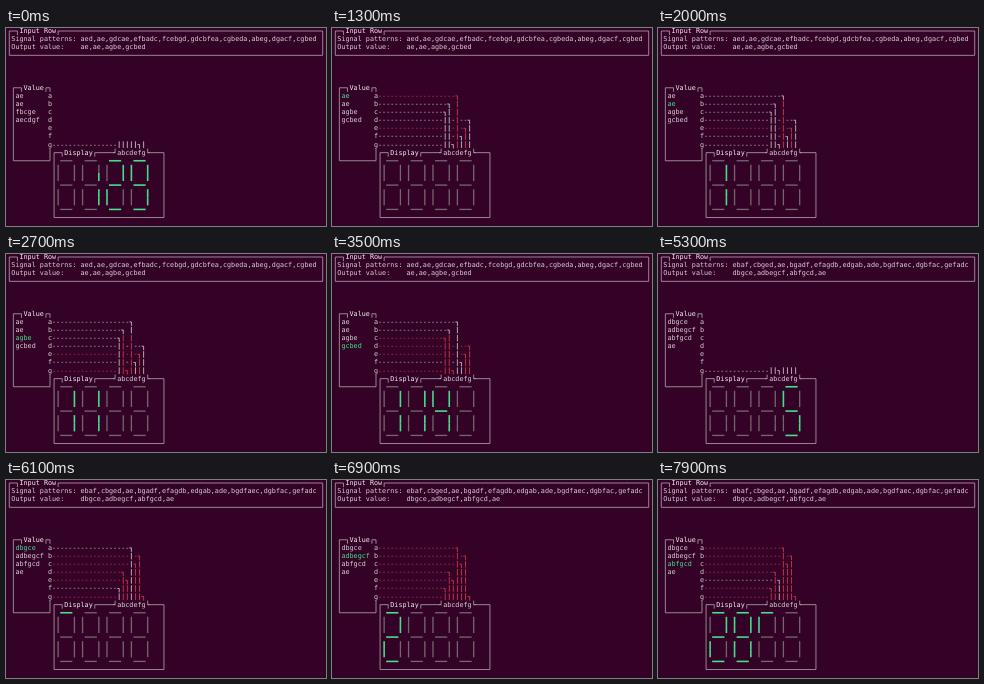
Recreate the animation shown at these times as an HTML page with a canvas. Size 320 px wide and 198 px high, loop 8000 ms.

```html
<!DOCTYPE html>
<html>
<head>
<meta charset="utf-8">
<style>
html, body { margin: 0; width: 100%; height: 100%; overflow: hidden; background: #340226; }
canvas { display: block; width: 320px; height: 198px; }
</style>
</head>
<body>
<canvas id="stage"></canvas>
<script>
const canvas = document.getElementById('stage');
const ctx = canvas.getContext('2d');
const dpr = window.devicePixelRatio || 1;
canvas.width = 320 * dpr;
canvas.height = 198 * dpr;

const LOOP = 8000, STEP = 42.8, WIPE = 45;
const BG = '#340226', TEXT = '#d6d0d4', LINE = '#b0a6ac', RED = '#e63c50', GREEN = '#45e08a', DIM = '#74686e';
const LETTERS = 'abcdefg', CELL = 4.07, ROW = 8.11;

// Centre of a terminal cell
const cx = col => 3.3 + col * CELL;
const cy = row => 3 + row * ROW;

// map[i] is the letter wired to segment i; values are swapped from `swap`, decoding begins at `start`
const entries = [
  { map: 'caegbdf', values: ['ed', 'ed', 'fbcge', 'aecdgf'] },
  { map: 'dbagfec', values: ['ae', 'ae', 'agbe', 'gcbed'], begin: 0, swap: -500, start: 995,
    patterns: 'aed,ae,gdcae,efbadc,fcebgd,gdcbfea,cgbeda,abeg,dgacf,cgbed' },
  { map: 'dfebcag', values: ['dbgce', 'adbegcf', 'abfgcd', 'ae'], begin: 4150, swap: 4190, start: 5716,
    patterns: 'ebaf,cbged,ae,bgadf,efagdb,edgab,ade,bgdfaec,dgbfac,gefadc' }
];

// Each value takes 7 steps to paint, one per lit segment, and 8 to reset
for (const e of entries.slice(1)) {
  let at = e.start;
  e.times = e.values.map(v => {
    const now = at;
    at += (15 + v.length) * STEP;
    return now;
  });
  e.end = at;
}

function text(str, col, row, color = TEXT) {
  ctx.fillStyle = color;
  for (const ch of str) {
    if (ch !== ' ') ctx.fillText(ch, cx(col), cy(row) + 0.3);
    col++;
  }
}

function line(points, color = LINE, width = 0.8) {
  ctx.strokeStyle = color;
  ctx.lineWidth = width;
  ctx.beginPath();
  points.forEach(([x, y]) => ctx.lineTo(x, y));
  ctx.stroke();
}

function box(left, top, right, bottom, title) {
  const x = cx(left), y = cy(top), r = cx(right), b = cy(bottom);
  const tick = y + 4, end = cx(left + 3 + title.length);
  line([[cx(left + 2), tick], [cx(left + 2), y], [x, y], [x, b], [r, b], [r, y], [end, y], [end, tick]]);
  text(title, left + 3, top, '#f4f0f2');
}

function wireRow(map, row, isRed) {
  const target = LETTERS.indexOf(map[row]);
  const color = i => isRed(i) ? RED : TEXT;
  text('-'.repeat(16), 11, row + 8, color(row));
  for (let c = 0; c < 7; c++) {
    const owner = map.indexOf(LETTERS[c]);
    const x = cx(27 + c), y = cy(row + 8);
    if (owner === row) line([[x - 2, y], [x, y], [x, y + 4]], color(row));
    else if (owner < row) line([[x, y - 3.2], [x, y + 3.4]], color(owner));
    else if (c < target) text('-', 27 + c, row + 8, color(row));
  }
}

function drawWires(e, prev, t) {
  const active = e.times.findLastIndex(at => t >= at);
  for (let row = 0; row < 7; row++) {
    const i = Math.max(active, 0), value = e.values[i];
    const steps = (t - e.times[i]) / STEP;
    const painted = steps >= 7 - row;
    const reset = steps >= 8 + value.length + row;
    if (i === 0 && !painted) {
      if (row === 6) wireRow(prev.map, row, () => false);
      continue;
    }
    if (i === 3 && reset && row < 6) continue;
    wireRow(e.map, row, r => painted && !reset && value.includes(LETTERS[r]));
  }
}

function drawValues(e, prev, t) {
  for (let i = 0; i < 4; i++) {
    const on = t >= e.times[i] && t < (e.times[i + 1] || e.end);
    const value = t >= e.swap + 8 * WIPE * i ? e.values[i] : prev.values[i];
    text(value, 2, 8 + i, on ? GREEN : TEXT);
  }
}

// half selects the upper or lower cell of an upright segment
function litAt(e, prev, t, digit, seg, half) {
  if (t < e.start) {
    const off = e.swap + (8 * digit + seg + 1 + half / 2) * WIPE;
    return t < off && prev.values[digit].includes(prev.map[seg]);
  }
  const value = e.values[digit];
  if (!value.includes(e.map[seg])) return false;
  const order = [...e.map.slice(0, seg)].filter(ch => value.includes(ch)).length;
  return t >= e.times[digit] + (8 + order) * STEP;
}

function drawDigit(e, prev, t, digit) {
  const col = 12 + digit * 6;
  for (let seg = 0; seg < 7; seg++) {
    const flat = seg % 3 === 0;
    const row = 16 + Math.floor(seg / 3) * 3 + (flat ? 0 : 1);
    for (let half = 0; half < (flat ? 1 : 2); half++) {
      const lit = litAt(e, prev, t, digit, seg, half);
      const x = cx(col + (seg % 3 === 2 ? 4 : 0)), y = cy(row + half);
      const points = flat
        ? [[cx(col + 0.5), y], [cx(col + 3.5), y]]
        : [[x, y - ROW / 2], [x, y + ROW / 2]];
      line(points, lit ? GREEN : DIM, lit ? 1.6 : 1.3);
    }
  }
}

function draw(t) {
  const n = t >= entries[2].begin ? 2 : 1;
  const e = entries[n], prev = entries[n - 1];
  ctx.setTransform(dpr, 0, 0, dpr, 0, 0);
  ctx.fillStyle = BG;
  ctx.fillRect(0, 0, 320, 198);
  ctx.font = '6.75px "DejaVu Sans Mono", monospace';
  ctx.textAlign = 'center';
  ctx.textBaseline = 'middle';

  box(0, 0, 77, 3, 'Input Row');
  text('Signal patterns: ' + e.patterns, 1, 1);
  text('Output value:    ' + e.values.join(), 1, 2);

  box(1, 7, 10, 16, 'Value');
  ctx.fillStyle = BG;
  ctx.fillRect(cx(9.5), cy(7.5), CELL, 7 * ROW);
  [...LETTERS].forEach((ch, i) => text(ch, 10, 8 + i));
  drawValues(e, prev, t);
  drawWires(e, prev, t);

  box(11, 15, 38, 23, 'Display');
  const y = cy(15);
  ctx.fillStyle = BG;
  ctx.fillRect(cx(26), y - 1, cx(34) - cx(26), 2);
  line([[cx(25.5), y], [cx(26), y], [cx(26), y - 4]]);
  line([[cx(34), y - 4], [cx(34), y], [cx(34.5), y]]);
  text(LETTERS, 27, 15);
  for (let i = 0; i < 4; i++) drawDigit(e, prev, t, i);
}

function tick() {
  draw(performance.now() % LOOP);
  requestAnimationFrame(tick);
}
tick();
</script>
</body>
</html>
```
